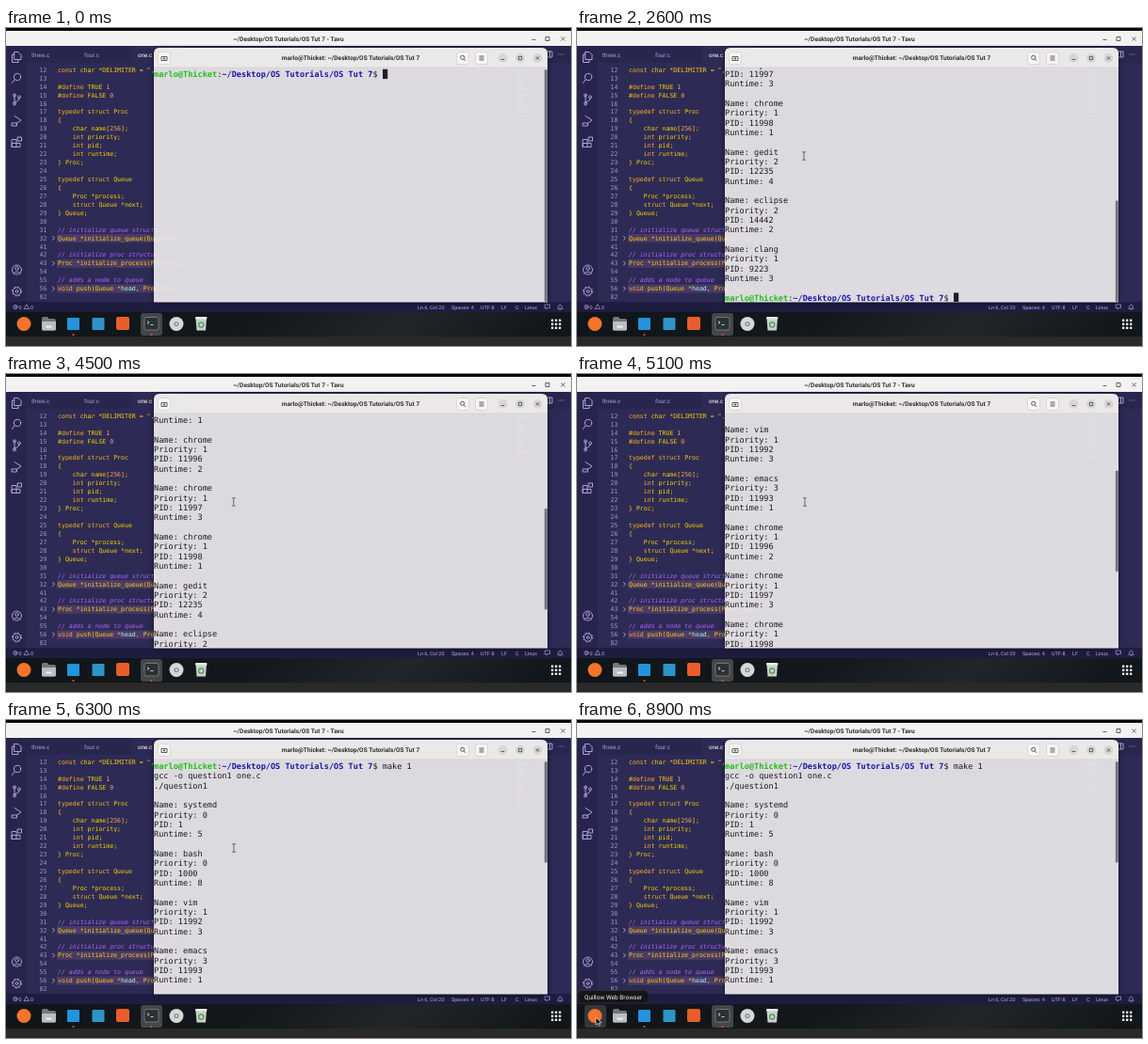
These frames come from a looping animation (600x338 px, 9000 ms). An HTML page:

```html
<!DOCTYPE html>
<html lang="en">
<head>
<meta charset="utf-8">
<title>Terminal session</title>
<style>
html, body { margin: 0; width: 100%; height: 100%; overflow: hidden; background: #000; }
#stage { display: block; width: 600px; height: 338px; }
text { white-space: pre; text-rendering: geometricPrecision; font-family: Roboto, sans-serif; }
.title { font-size: 6.6px; font-weight: 700; fill: #303030; text-anchor: middle; }
.tab { font-size: 6.3px; fill: #a69fd4; }
.tab.active { fill: #fff; }
.status { font-size: 5.5px; fill: #b3acdf; }
.listing text { font: 6.55px "DejaVu Sans Mono", monospace; fill: #fad000; }
.listing .num { fill: #9d94d6; text-anchor: end; }
.listing .word { fill: #ffb020; }
.listing .note { fill: #b362ff; font-style: italic; }
.listing .arg { fill: #9effff; }
.listing .digit { fill: #ffa05c; }
.term text { font: 8.59px "DejaVu Sans Mono", monospace; fill: #1d1b22; }
.term .host { fill: #1fbf14; font-weight: 700; }
.term .path { fill: #1a16a8; font-weight: 700; }
.line { fill: none; stroke: #aaa3d8; stroke-width: 1; stroke-linecap: round; stroke-linejoin: round; }
.thin { stroke-width: .7; }
.dark { fill: none; stroke: #3b3b3b; stroke-width: .8; }
</style>
</head>
<body>
<svg id="stage" viewBox="0 0 600 338">
  <defs>
    <linearGradient id="wall" x2="1" y2=".05">
      <stop stop-color="#101519"/><stop offset=".45" stop-color="#12181b"/>
      <stop offset=".72" stop-color="#20262a"/><stop offset="1" stop-color="#11161a"/>
    </linearGradient>
    <filter id="shadow" x="-5%" y="-5%" width="110%" height="110%"><feGaussianBlur stdDeviation="3"/></filter>
    <clipPath id="editor"><rect x="22" y="38" width="578" height="253"/></clipPath>
  </defs>

  <!-- editor window -->
  <rect width="600" height="338" fill="#050505"/>
  <rect y="3" width="600" height="16" fill="#f3f2f1"/>
  <text class="title" x="300" y="13.5">~/Desktop/OS Tutorials/OS Tut 7 - Tavu</text>
  <path class="dark" d="M558.5 12.5h4M573 9.5h4v4h-4zM589.5 9.5l4 4m0-4l-4 4"/>
  <rect y="19" width="600" height="272" fill="#2d2b55"/>
  <rect y="19" width="600" height="18" fill="#28264e"/>
  <rect x="133" y="19" width="56" height="18" fill="#2d2b55"/>
  <rect y="19" width="22" height="272" fill="#28254c"/>
  <text class="tab" x="27" y="30.5">three.c</text>
  <text class="tab" x="83" y="30.5">four.c</text>
  <text class="tab active" x="140" y="30.5">one.c</text>
  <path class="line" d="M575 25h5v6h-5zM577.5 25v6M587 28h.1M589.5 28h.1M592 28h.1"/>
  <path class="line" d="M9 25.5h4l3 3v5H9zM9 28H6.5v8.5h6.5V34
    M8.8 55.2L6.5 58.5M9 71.5v9M9 78.5q5 0 5-4
    M9 93.5l7 4.5-5 3.5M6.5 101h5v3h-5z
    M6.5 118.5h4.5v8h-4.5zM6.5 122.5h8.5v4h-8.5zM12.5 116h4v4h-4z
    M7.5 261q4-4 8 0"/>
  <g class="line">
    <circle cx="12" cy="52" r="3.7"/>
    <circle cx="9" cy="71.5" r="1.5"/><circle cx="14" cy="73.5" r="1.5"/><circle cx="9" cy="80.5" r="1.5"/>
    <circle cx="11.5" cy="257" r="5"/><circle cx="11.5" cy="255.5" r="1.8"/>
    <circle cx="11.5" cy="280" r="4.2"/><circle cx="11.5" cy="280" r="1.4"/>
    <circle cx="11.5" cy="280" r="5" stroke-dasharray="1.6 2.327" stroke-linecap="butt"/>
  </g>
  <g class="listing" id="listing" clip-path="url(#editor)"></g>
  <g id="map" fill="#8f86a8"></g>

  <!-- status bar -->
  <rect y="291" width="600" height="11" fill="#1e1d40"/>
  <g class="line thin">
    <circle cx="10" cy="296.5" r="2.2"/>
    <path d="M9 295.5l2 2m0-2l-2 2M22 294l2.5 4.5h-5zM572.5 294h5v3.5h-2l-1.5 1.5v-1.5h-1.5zM586 298q1-1 1-3 1.5-2 3 0 0 2 1 3zM588 299.3h1"/>
  </g>
  <g id="status"></g>

  <!-- terminal window -->
  <rect x="157" y="23" width="418" height="269" rx="6" opacity=".55" filter="url(#shadow)"/>
  <rect x="157" y="42" width="418" height="249.5" fill="#fbf9fb" opacity=".87"/>
  <path d="M157 42V27q0-6 6-6H569q6 0 6 6V42z" fill="#ebe9e8"/>
  <path d="M157 42h418" stroke="#d1ced2" stroke-width=".7"/>
  <text class="title" x="366" y="34">marlo@Thicket: ~/Desktop/OS Tutorials/OS Tut 7</text>
  <g fill="#f6f5f4" stroke="#d0cdcb" stroke-width=".7">
    <rect x="161.5" y="25.5" width="13" height="13" rx="2.5"/>
    <rect x="478.5" y="25.5" width="13" height="13" rx="2.5"/>
    <rect x="498.5" y="25.5" width="13" height="13" rx="2.5"/>
  </g>
  <g fill="#d9d7d6"><circle cx="527.5" cy="32" r="5"/><circle cx="546" cy="32" r="5"/><circle cx="564.5" cy="32" r="5"/></g>
  <path class="dark" d="M165 34.5v-4h6v4zM168 31.3v2.4M166.8 32.5h2.4M486.3 33l2 2M502.5 30h5M502.5 32h5M502.5 34h5M525.7 33.5h3.6M544.3 30.3h3.4v3.4h-3.4zM562.8 30.3l3.4 3.4m0-3.4l-3.4 3.4"/>
  <circle class="dark" cx="484.7" cy="31.3" r="2.1"/>
  <svg class="term" x="157" y="42" width="418" height="249">
    <g id="log"><rect id="caret" width="5.2" height="10.3" fill="#201d26"/></g>
  </svg>
  <rect id="thumb" x="571.8" width="3" rx="1.5" fill="#77747c"/>

  <!-- dock -->
  <rect y="302" width="600" height="26" fill="url(#wall)"/>
  <rect y="328" width="600" height="10" fill="#292929"/>
  <rect x="143" y="303" width="23" height="24" rx="3" fill="#43474a"/>
  <rect id="hover" x="8" y="303" width="23" height="24" rx="3" fill="#34383b"/>
  <circle cx="19" cy="314.5" r="7.5" fill="#f5742a"/>
  <path d="M38 309q0-2 2-2h4l1.5 2H51q2 0 2 2v9q0 1.5-2 1.5H40q-2 0-2-1.5z" fill="#73787c"/>
  <path d="M38 312h15v8q0 1.5-2 1.5H40q-2 0-2-1.5z" fill="#b9bdc1"/>
  <path d="M42.5 317.5h6" stroke="#f0f0f0" stroke-width="2"/>
  <rect x="65" y="308" width="13" height="13" rx="1" fill="#2294dc"/>
  <rect x="91.5" y="308" width="13" height="13" rx="1" fill="#2e94c8"/>
  <rect x="117" y="307" width="14" height="14" rx="2" fill="#e95d2a"/>
  <rect x="147" y="307.5" width="15" height="13.5" rx="2" fill="#2c3133" stroke="#8b9093" stroke-width=".7"/>
  <path d="M150 311.5l2 1.5-2 1.5M153.5 315.5h3" fill="none" stroke="#eee" stroke-width=".8"/>
  <circle cx="181" cy="314.5" r="7.5" fill="#d7d7d7"/><circle cx="181" cy="314.5" r="2.6" fill="#8d8d8d"/>
  <circle cx="181" cy="314.5" r="1.1" fill="#f7f7f7"/>
  <path d="M201.5 309h11.5l-1 12.5h-9.5z" fill="#c9cfc9"/><rect x="201" y="307" width="12.5" height="2.5" rx="1" fill="#eceeec"/>
  <circle cx="207.2" cy="315.5" r="2.6" fill="none" stroke="#469a54" stroke-width="1.2"/>
  <g fill="#e95420"><circle cx="71.5" cy="326" r="1.1"/><circle cx="154.5" cy="326" r="1.1"/></g>
  <g id="apps" fill="#f4f4f4"></g>
  <g id="tip">
    <rect x="1" y="287.5" width="75" height="13.5" rx="5" fill="#161616" stroke="#343434" stroke-width=".6"/>
    <text x="38.5" y="296.8" font-size="6.5" fill="#f2f2f2" text-anchor="middle">Quillow Web Browser</text>
  </g>
  <g id="pointer">
    <path id="beam" d="M-2-4.5q2 0 2 1.5 0-1.5 2-1.5M0-3v6M-2 4.5q2 0 2-1.5 0 1.5 2 1.5" fill="none" stroke="#6f6d75" stroke-width="1.1"/>
    <path id="arrow" d="M0 0v8l2-1.7 1.3 2.8 1.3-.6-1.3-2.7h2.7z" fill="#111" stroke="#fff" stroke-width=".6"/>
  </g>
</svg>
<script>
const $ = id => document.getElementById(id);
const NS = "http://www.w3.org/2000/svg";

function add(parent, tag, attrs, markup = "") {
  const el = document.createElementNS(NS, tag);
  for (const key in attrs) el.setAttribute(key, attrs[key]);
  el.innerHTML = markup;
  return parent.appendChild(el);
}

// Editor text: each row carries its line number
const listing = `11
12 const char *DELIMITER = ", ";
13
14 #define TRUE 1
15 #define FALSE 0
16
17 typedef struct Proc
18 {
19     char name[256];
20     int priority;
21     int pid;
22     int runtime;
23 } Proc;
24
25 typedef struct Queue
26 {
27     Proc *process;
28     struct Queue *next;
29 } Queue;
30
31 // initialize queue structure
32 Queue *initialize_queue(Queue *q…
41
42 // initialize proc structure
43 Proc *initialize_process(Proc *p…
54
55 // adds a node to queue
56 void push(Queue *head, Proc *p)…
82`.split("\n");

const paint = s => s.startsWith("//") ? `<tspan class="note">${s}</tspan>`
  : s.replace(/\b(const|struct|typedef|define|void|int)\b|\bhead\b|\b\d+\b/g, (word, key) =>
      `<tspan class="${key ? "word" : word === "head" ? "arg" : "digit"}">${word}</tspan>`);

listing.forEach((row, i) => {
  const y = 38 + (i - .02) * 8.94, num = row.slice(0, 2), body = row.slice(3);
  if (["32", "43", "56"].includes(num)) {
    add($("listing"), "rect", {x: 54, y: y - 6.6, width: 483, height: 8.94, fill: "#4b3a68"});
    add($("listing"), "path", {class: "line", d: `M49.5 ${y - 4.2}l2 2-2 2`});
  }
  add($("listing"), "text", {class: "num", x: 43.5, y}, num);
  add($("listing"), "text", {x: 55, y}, paint(body));
});

for (let i = 0; i < 24; i++)
  add($("map"), "rect", {x: 541 + i % 3, y: 43 + i * 2, width: 4 + i * 7 % 9, height: 1});
for (let i = 0; i < 9; i++)
  add($("apps"), "rect", {x: 579 + i % 3 * 4, y: 309.5 + (i / 3 | 0) * 4, width: 2.4, height: 2.4, rx: .6});
[[13.5, "0"], [26, "0"], [437, "Ln 6, Col 20"], [473, "Spaces: 4"], [504, "UTF-8"], [526, "LF"], [541, "C"], [551, "Linux"]]
  .forEach(([x, label]) => add($("status"), "text", {class: "status", x, y: 298.5}, label));

// Terminal text
const CHAR = 5.1715, ROW = 10.33, VIEW = 24, PROMPT = 47;
const prompt = '<tspan class="host">marlo@Thicket</tspan>:<tspan class="path">~/Desktop/OS Tutorials/OS Tut 7</tspan>$ ';
const jobs = [
  ["systemd", 0, 1, 5], ["bash", 0, 1000, 8], ["vim", 1, 11992, 3], ["emacs", 3, 11993, 1],
  ["chrome", 1, 11996, 2], ["chrome", 1, 11997, 3], ["chrome", 1, 11998, 1],
  ["gedit", 2, 12235, 4], ["eclipse", 2, 14442, 2], ["clang", 1, 9223, 3]
];
const lines = [prompt + '<tspan id="typed"></tspan>', "gcc -o question1 one.c", "./question1", ""];
for (const [name, priority, pid, runtime] of jobs)
  lines.push("Name: " + name, "Priority: " + priority, "PID: " + pid, "Runtime: " + runtime, "");
lines.push(prompt);
const rows = lines.map((s, i) => add($("log"), "text", {x: 0, y: 10 + i * ROW}, s));

const show = (el, on) => el.style.display = on ? "" : "none";
const typing = [[800, 2], [1000, 3], [1200, 4], [1400, 5], [1700, 6]];

// Pointer path: time, x, y
const path = [[2400, 241, 136], [3600, 241, 136], [5000, 242, 136], [6800, 242, 136], [7200, 245, 136],
  [7700, 232, 150], [8300, 26, 310], [8700, 20, 316], [9000, 20, 316]];

function pointerAt(t) {
  const i = Math.max(1, path.findIndex(p => p[0] > t));
  const [a, x, y] = path[i - 1], [b, u, v] = path[i];
  let k = Math.min(1, Math.max(0, (t - a) / (b - a)));
  k = k * k * (3 - 2 * k);
  return [x + (u - x) * k, y + (v - y) * k];
}

function draw(t) {
  const typed = typing.reduce((n, [at, count]) => t >= at ? count : n, 0);
  const count = t < 2000 ? 1 : t < 2400 ? 3 : lines.length;
  const notches = Math.max(0, Math.floor((t - 3800) / 200));
  const top = Math.max(0, Math.max(0, count - VIEW) - 3 * notches);

  $("typed").textContent = "make 1".slice(0, typed);
  rows.forEach((el, i) => show(el, i < count && !(count === 3 && i === 2)));
  $("log").setAttribute("transform", `translate(0 ${-top * ROW})`);
  $("caret").setAttribute("x", count === 3 ? 0 : (PROMPT + (count === 1 ? typed : 0)) * CHAR);
  $("caret").setAttribute("y", 1.8 + (count - 1) * ROW);

  const total = Math.max(VIEW, count);
  $("thumb").setAttribute("y", 44 + 247 * top / total);
  $("thumb").setAttribute("height", 247 * VIEW / total);

  const [x, y] = pointerAt(t), inside = x > 157 && y < 291;
  show($("pointer"), t >= 2400);
  $("pointer").setAttribute("transform", `translate(${x} ${y})`);
  show($("beam"), inside);
  show($("arrow"), !inside);
  show($("hover"), t >= 8300);
  show($("tip"), t >= 8500);
}

const start = performance.now();
function tick() {
  draw((performance.now() - start) % 9000);
  requestAnimationFrame(tick);
}
tick();
</script>
</body>
</html>
```
